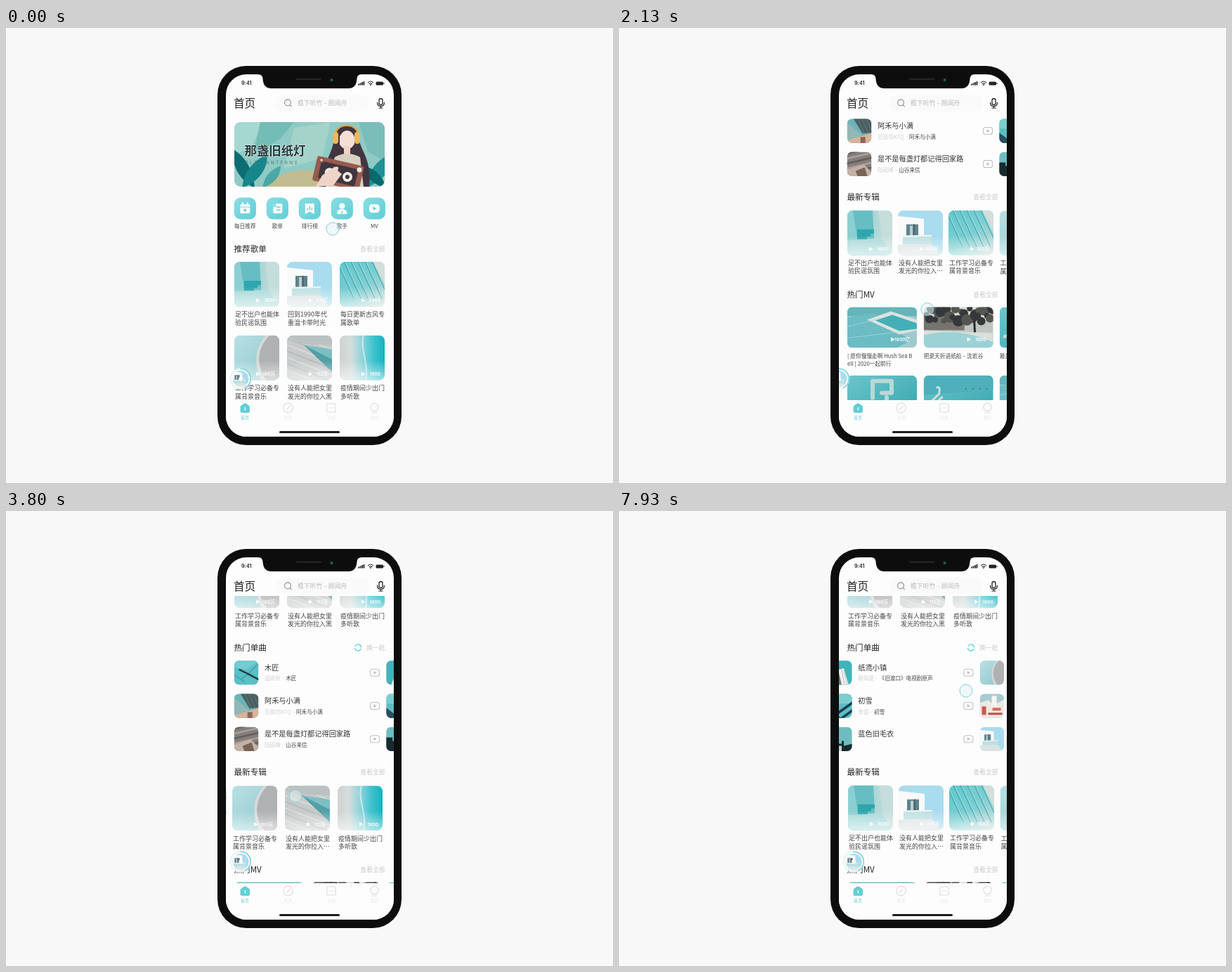
Animation of 864 by 648 pixels, one loop 8 s. Source, as an HTML page:

```html
<!DOCTYPE html>
<html lang="zh-CN">
<meta charset="utf-8">
<title>音乐首页</title>
<style>
  html, body { margin: 0; width: 100%; height: 100%; overflow: hidden; background: #f8f8f8; }
  svg { display: block; width: 100%; height: 100%; }
  text { font-family: "Noto Sans CJK SC", "Noto Sans CJK", "Noto Sans", sans-serif; white-space: pre; }
  .latin { font-family: Inter, Roboto, "Noto Sans CJK SC", "Noto Sans CJK", sans-serif; }
</style>
<svg id="stage" viewBox="0 0 864 648"></svg>
<script>
const TEAL = '#62ced5', DARK = '#333', GREY = '#c9c9c9', PAGE = 216.5, LOOP = 8000;

// Drawing helpers
const rect = (x, y, w, h, fill, r = 0, more = '') =>
  `<rect x="${x}" y="${y}" width="${w}" height="${h}" rx="${r}" fill="${fill}" ${more}/>`;
const circle = (x, y, r, fill, more = '') => `<circle cx="${x}" cy="${y}" r="${r}" fill="${fill}" ${more}/>`;
const poly = (points, fill) => `<polygon points="${points}" fill="${fill}"/>`;
const path = (d, fill) => `<path d="${d}" fill="${fill}"/>`;
const line = (d, color, width = 1) =>
  `<path d="${d}" fill="none" stroke="${color}" stroke-width="${width}" stroke-linecap="round" stroke-linejoin="round"/>`;
const group = (x, y, body, more = '') => `<g transform="translate(${x} ${y})" ${more}>${body}</g>`;
const text = (x, middle, size, str, fill = DARK, more = '') =>
  `<text x="${x}" y="${middle + size * .37}" font-size="${size}" fill="${fill}" ${more}>${str}</text>`;
const END = 'text-anchor="end"', MID = 'text-anchor="middle"';
const clip = (id, shape) => `<clipPath id="${id}">${shape}</clipPath>`;
const gradient = (id, x2, y2, ...colors) => `<linearGradient id="${id}" x2="${x2}" y2="${y2}">${
  colors.map((c, i) => `<stop offset="${i / (colors.length - 1)}" stop-color="${c}"/>`).join('')}</linearGradient>`;
const repeat = (n, fn) => Array.from({ length: n }, (_, i) => fn(i)).join('');

const defs = `<defs>
  ${gradient('mint', 1, 1, '#86dfe3', '#62cdd6')}
  ${gradient('wall', 1, 0, '#74c6c9', '#a3d5d5', '#c9dedb')}
  ${gradient('slats', 1, 1, '#60c6cc', '#7bced1', '#cfdcda')}
  ${gradient('mist', 1, 1, '#b9e0e4', '#8cc6cb')}
  ${gradient('sea', 1, 0, '#cfd2d1', '#d5dddb', '#8fd3da', '#3fc3cf', '#14b2bf')}
  ${gradient('water', 1, 1, '#6cc5cb', '#37a6af')}
  ${gradient('fade', 0, 1, '#ffffff00', '#ffffff99')}
  ${clip('card', rect(0, 0, 64, 64, '#000', 8))}
  ${clip('thumb', rect(0, 0, 34.5, 34.5, '#000', 7))}
  ${clip('video', rect(0, 0, 99, 58, '#000', 7))}
  ${clip('banner', rect(325, 134, 214, 92, '#000', 9))}
  ${clip('screen', rect(313, 66, 239, 516, '#000', 29))}
  ${clip('feedArea', rect(313, 121, 239, 409, '#000'))}
  ${clip('label', circle(0, 0, 11.5, '#000'))}
</defs>`;

// Cover art, drawn on a 64 px square
const covers = {
  stairs: rect(0, 0, 64, 64, 'url(#wall)') + poly('0,0 8,0 18,30 14,64 0,64', '#8bcfd1') +
    poly('8,0 36,0 38,40 14,40', '#66bec2') +
    poly('14,27 38,27 38,33 33,33 33,37 28,37 28,41 14,41', '#2fa5ae') +
    poly('44,0 64,0 64,64 50,46', '#c5dedb') + poly('0,42 50,42 64,64 0,64', '#a9d9da'),
  house: rect(0, 0, 64, 64, '#a9dcee') + poly('0,8 37,12 37,64 0,64', '#fafafa') +
    rect(12, 20, 17, 16, '#61828a') + rect(17, 22, 4, 14, '#b8cfd2') + line('M23 20V36', '#3d555c', 1.2) +
    poly('7,36 48,35 48,48 7,49', '#bfdfe2') + poly('7,36 48,35 48,37 7,38', '#edf7f7') +
    poly('0,49 48,48 60,64 0,64', '#dce3e3'),
  slats: rect(0, 0, 64, 64, 'url(#slats)') +
    repeat(7, i => line(`M${i * 10 - 4} 0l24 52`, '#46a5ab', 1.1) + line(`M${i * 10 - 2} 0l24 52`, '#a6e0e2', .8)) +
    poly('48,0 64,0 64,32', '#d3dedb'),
  curve: rect(0, 0, 64, 64, 'url(#mist)') + path('M50 0C32 18 30 44 46 64H64V0Z', '#b0b1b3') +
    path('M50 0C32 18 30 44 46 64H39C27 42 29 18 45 0Z', '#d9d9d8'),
  planks: rect(0, 0, 64, 64, '#c7caca') +
    repeat(8, i => line(`M-4 ${i * 9 - 6}l72 28`, i % 2 ? '#b2b7b7' : '#dcdedd', 1.5)) +
    poly('24,14 64,20 64,52', '#529fa5') + poly('24,14 64,20 64,34', '#7cbfc3') + poly('0,0 64,0 64,14 20,12', '#bac1c1'),
  shore: rect(0, 0, 64, 64, 'url(#sea)') + line('M34 0C28 18 42 40 37 64', '#ffffff88', 2),
};

// Song art, drawn on a 34.5 px square
const thumbs = {
  pole: rect(0, 0, 35, 35, '#5abfc7') + poly('0,0 35,0 18,13 0,10', '#74cbd1') +
    line('M9 27L20 19 35 4', '#2f7f89', 1) + line('M8 13L22 20 35 27', '#263f47', 2.6) + line('M0 20l15 10', '#45a4ad', 1.5),
  roof: rect(0, 0, 35, 35, '#6bb4b8') + poly('9,0 35,0 35,20 22,21', '#4a5f62') +
    repeat(4, i => line(`M${15 + i * 6} 0l9 20`, '#657a7b')) + poly('0,5 26,28 0,30', '#93b7b6') +
    poly('0,31 35,20 35,35 0,35', '#d7b49a') + rect(19, 26, 7, 9, '#8c6658'),
  tiles: rect(0, 0, 35, 35, '#847d7b') + repeat(5, i => line(`M-2 ${i * 7 + 3}l38 -9`, i % 2 ? '#aaa09a' : '#625e5d', 2.5)) +
    poly('0,25 24,18 35,29 35,35 0,35', '#c5b2a5') + poly('12,27 25,22 29,35 15,35', '#786459'),
  tower: rect(0, 0, 35, 35, '#42b3ba') + poly('7,35 15,13 23,11 30,35', '#eef0ed') +
    poly('15,13 20,35 12,35', '#6d7c7e') + line('M20 13l4 22M23 13l5 22', '#b0bcbd', .8),
  beams: rect(0, 0, 35, 35, '#5dbcc2') + rect(0, 0, 35, 14, '#7dced0') +
    line('M4 35L35 13M17 37L36 23', '#163f4b', 3.5) + poly('0,20 20,35 0,35', '#2b4d59'),
  skyline: rect(0, 0, 35, 35, '#6dbdc0') + poly('0,15 9,15 9,20 14,20 14,24 20,24 20,20 23,20 23,27 35,24 35,35 0,35', '#182a2f') +
    rect(11, 12, 3, 23, '#25383c') + rect(15, 27, 5, 8, '#c3d4d3'),
  bay: `<g transform="scale(.54)">${covers.curve}</g>`,
  red: rect(0, 0, 35, 35, '#a8cbd2') + poly('0,13 12,9 20,16 35,8 35,35 0,35', '#eee8e2') +
    rect(3, 18, 6, 12, '#c95a50') + rect(17, 3, 7, 15, '#f6f4f1') + rect(18, 20, 12, 4, '#d96a5c') + rect(12, 27, 20, 3, '#bb5149'),
  balcony: `<g transform="scale(.54)">${covers.house}</g>`,
};

// Video art, drawn on 99 x 58 px
const clips = {
  pool: rect(0, 0, 99, 58, '#9fcbce') + rect(0, 0, 99, 13, '#64b4ba') + poly('0,15 38,8 90,48 70,58 0,58', '#6cbcc4') +
    poly('28,18 62,6 99,18 99,33 74,39', '#dce2df') + poly('40,19 64,11 99,23 99,31 74,34', '#45afb8') + line('M0 28L48 16M0 44L70 36', '#a8dade', .7),
  tree: rect(0, 0, 99, 58, '#bfc6c2') + rect(0, 0, 99, 18, '#d9d9d4') + rect(0, 13, 58, 20, '#77736e') +
    repeat(24, i => circle(4 + i * 4.1, 11 + 9 * Math.sin(i * 2.4), 4 + i % 3 * 2, i % 2 ? '#35383a' : '#555552')) +
    line('M73 40L72 20', '#262a2c', 3) + poly('0,33 99,37 99,58 0,58', '#d9dfdb') + path('M0 40Q50 28 99 50V58H0Z', '#9bd2d5'),
  ruins: rect(0, 0, 99, 58, 'url(#water)') + line('M8 42H56V31M36 32V8H63V25H49', '#b9d8d6', 6) + line('M8 45H58', '#5d9da3', 2),
  ladder: rect(0, 0, 99, 58, 'url(#water)') + poly('0,0 99,0 99,20 0,28', '#4fafba') +
    line('M2 46L22 26Q24 15 19 17M9 47L26 31', '#cadfdc', 3) + repeat(4, i => circle(60 + i * 10, 19, 1, '#287780')),
};

const play = (x, y) => poly(`${x},${y - 3} ${x + 5.5},${y} ${x},${y + 3}`, '#fff');
const tile = (shape, x, y, art) => group(x, y, art, `clip-path="url(#${shape})"`);
const lines = (x, y, size, rows, gap = 11.5) => rows.split('|').map((s, i) => text(x, y + i * gap, size, s, '#444')).join('');

const card = (x, y, [art, count, caption]) =>
  tile('card', x, y, covers[art] + rect(0, 36, 64, 28, 'url(#fade)') + play(31, 55) +
    text(58, 55, 6.5, count, '#fff', END + ' class="latin" font-weight="600"')) + lines(x + 1, y + 75, 9, caption);
const cards = (y, gap, list) => list.map((item, i) => card(325 + i * gap, y, item)).join('');

const song = (y, [art, title, artist, album]) =>
  tile('thumb', 324.7, y - 17.2, thumbs[art]) + text(368, y - 7.5, 10.2, title) +
  (artist ? text(368, y + 8.3, 7.6, `${artist} – <tspan fill="#444">${album}</tspan>`, '#d2d2d2') : '') +
  rect(518.5, y - 5, 13, 10, 'none', 3, 'stroke="#c2c2c2" stroke-width="1.1"') +
  poly(`523.5,${y - 2.3} 527.5,${y} 523.5,${y + 2.3}`, '#bbb');
const songs = (y, list) => list.map((item, i) => song(y + i * 47.2, item)).join('');

const video = (x, y, art, count, caption) =>
  tile('video', x, y, clips[art] + play(62, 46) +
    text(89, 46, 6.5, count, '#fff', END + ' class="latin" font-weight="600"')) + lines(x, y + 69.3, 7.7, caption);

const heading = (y, title, link = '查看全部') =>
  text(324.5, y, 11.6, title, '#222', 'font-weight="500"') + text(539.5, y, 8.8, link, GREY, END);

const study = '工作学习必备专|属背景音乐', home = '足不出户也能体|验民谣氛围';
const picksTop = [['stairs', '1800', home], ['house', '2.5亿', '回到1990年代|重温卡带时光'], ['slats', '2456', '每日更新古风专|属歌单']];
const picksLow = [['curve', '180万', study], ['planks', '112万', '没有人能把女里|发光的你拉入黑'], ['shore', '1800', '疫情期间少出门|多听歌']];
const albumsA = [['stairs', '1800', home], ['house', '240万', '没有人能把女里|发光的你拉入…'], ['slats', '180万', study]];
const albumsB = [picksLow[0], ['planks', '112万', '没有人能把女里|发光的你拉入…'], picksLow[2]];
const songsA = [['pole', '木匠', '温砚秋', '木匠'], ['roof', '阿禾与小满', '豆腐坊KTQ', '阿禾与小满'],
  ['tiles', '是不是每盏灯都记得回家路', '陆砚峰', '山谷来信']];
const songsB = [['tower', '纸鸢小镇', '穆知夏', '《旧渡口》电视剧原声'], ['beams', '初雪', '季遥', '初雪'], ['skyline', '蓝色旧毛衣']];
const songsC = [['bay', '浅滩拾贝', '程鹿溪', '浅滩拾贝'], ['red', '屋檐下的猫', '秦晚舟', '屋檐下的猫'], ['balcony', '阳台']];

const leaf = (x, y, w, h, fill) => path(`M${x} ${y}Q${x + w * .1} ${y - h * .7} ${x + w} ${y - h}Q${x + w} ${y - h * .3} ${x} ${y}Z`, fill);
const banner = `<g clip-path="url(#banner)">
  ${rect(325, 134, 214, 92, '#8fcac4')}
  ${poly('325,134 365,134 350,170 325,180', '#a5d8d0')}${poly('362,134 410,134 390,158 352,181', '#74bcb6')}
  ${poly('410,142 462,134 450,186 395,200', '#a3d3c9')}${poly('502,134 539,134 539,190 515,176', '#7bbeb9')}
  ${path('M360 226Q410 190 462 208V226Z', '#c2bd90')}
  ${leaf(354, 228, -32, 56, '#0c6d73')}${leaf(336, 228, 36, 48, '#16868a')}${leaf(365, 228, 26, 32, '#4aa8a7')}
  ${leaf(512, 228, 38, 50, '#228f94')}${leaf(540, 228, -30, 32, '#08696f')}
  ${path('M467 157C466 132 501 132 502 157C506 178 520 185 517 226H446C448 195 464 184 467 157Z', '#43353f')}
  ${path('M475 150Q486 142 496 150V165Q486 181 475 166Z', '#f5dfd4')}${rect(481, 168, 9, 15, '#efd3c6')}
  ${path('M473 149Q480 137 497 149V157Q492 145 485 146Q478 146 473 159Z', '#43353f')}
  ${path('M468 184Q485 174 504 184L509 226H455Z', '#d9d0c4')}
  ${line('M469 153C468 134 502 134 501 153', '#dba952', 2.5)}
  ${rect(465, 148, 8, 17, '#e9b85f', 4)}${rect(496, 148, 8, 17, '#e9b85f', 4)}
  <g transform="translate(473 206) rotate(13)">${rect(-34, -17, 68, 36, '#965b4e', 3)}
    ${rect(-27, -11, 54, 25, '#40363f', 3)}${circle(-12, 3, 7, '#f2ece5')}${circle(14, 3, 7, '#f2ece5')}
    ${circle(-12, 3, 3, '#40363f')}${circle(14, 3, 3, '#40363f')}</g>
  ${circle(449, 188, 4, '#965b4e')}${circle(503, 202, 3.5, '#f2ece5')}${circle(449, 188, 1.6, '#eee')}
  ${path('M441 226L450 210 467 198Q476 196 472 203L478 208 466 224Z', '#efd5c8')}
  ${text(339.5, 175, 17.4, '那盏旧纸灯', '#27383d', 'font-weight="700" stroke="#e4f1ed" stroke-width="1.2" paint-order="stroke"')}
  ${text(340, 192, 6.3, 'OLD LANTERNS', '#56797b', 'class="latin" letter-spacing="2.4"')}
</g>`;

const glyphs = [
  rect(-7, -6, 14, 13, '#fff', 2.5) + line('M-7 -2H7', '#70d3d9') + line('M-3.5 -8V-5M3.5 -8V-5', '#fff', 2) + circle(0, 2.4, 2, TEAL),
  rect(-6, -7, 13, 14, '#fff', 2.5) + line('M-1 -2H4M-1 2H4', TEAL, 1.3) + rect(-7, -7, 5, 5, '#8be0e4', 1),
  path('M-6.5 -7H6.5V8L0 4.5 -6.5 8Z', '#fff') + line('M-3 2V0M0 2V-3M3 2V-1', TEAL, 1.3),
  circle(0, -3.5, 4, '#fff') + path('M-7 8V6Q-6 1 0 1T7 6V8Z', '#fff') + line('M0 4V7', TEAL, 1.5),
  rect(-7.5, -6, 15, 12, '#fff', 4.5) + poly('-1.8,-3 3,0 -1.8,3', TEAL),
];
const shortcuts = ['每日推荐', '歌单', '排行榜', '歌手', 'MV'].map((name, i) => {
  const x = 340.3 + i * 46;
  return rect(x - 15.6, 241.5, 31.2, 31, 'url(#mint)', 9) + group(x, 257, glyphs[i]) + text(x, 282, 7.7, name, '#444', MID);
}).join('');

const feed = `<g clip-path="url(#feedArea)"><g id="feed">
  ${banner}${shortcuts}
  ${heading(315, '推荐歌单')}${cards(333, 75, picksTop)}${cards(437.7, 75, picksLow)}
  ${heading(558, '热门单曲', '换一批')}
  <g id="refresh">${circle(0, 0, 4.6, 'none', `stroke="${TEAL}" stroke-width="1.3" stroke-dasharray="12 2.45"`)}</g>
  <g id="oldSongs">${songs(593.8, songsA)}${group(PAGE, 0, songs(593.8, songsB))}</g>
  <g id="newSongs">${songs(593.8, songsB)}${group(PAGE, 0, songs(593.8, songsC))}</g>
  ${heading(735.3, '最新专辑')}
  <g id="albums">${cards(754.2, 72, albumsA)}${group(PAGE, 0, cards(754.7, 75, albumsB))}</g>
  ${heading(874, '热门MV')}
  ${video(325, 892, 'pool', '1800亿', '[ 愿你慢慢走啊 Hush Sea B|ell ] 2020一起前行')}
  ${video(433.7, 892, 'tree', '1800', '把夏天折进纸船 – 沈若谷')}
  ${video(541.7, 892, 'ruins', '', '最美的夏日海岸')}
  ${video(325, 989.4, 'ruins', '1800万', '青苔三寸月初升 《九重雁归》|（电视剧主题曲）')}
  ${video(433.7, 989.4, 'ladder', '1800', '《竹影书生》唐砚白动漫主题|曲 – 乔木川')}
  ${video(541.7, 989.4, 'pool', '', '最美的夏日海岸')}
  ${heading(1103.5, '新歌')}${songs(1139, songsB)}${group(PAGE, 0, songs(1139, songsA))}
</g></g>`;

const header = text(335, 78.5, 7.2, '9:41', '#222', 'class="latin" font-weight="600"') +
  repeat(4, i => rect(501 + i * 2.5, 79.5 - i * 1.2, 1.8, 2 + i * 1.2, '#222', .5)) +
  line('M515.5 77.5Q519 74.5 522.5 77.5M517 79.5Q519 78 521 79.5', '#222', 1.1) + circle(519, 81, .9, '#222') +
  rect(526.5, 76.5, 10.5, 5, '#222', 1.5) + rect(537.5, 78, 1, 2, '#222') +
  text(324, 107, 15.6, '首页', '#222', 'font-weight="500"') + rect(385, 95.5, 132, 23, '#fafafa', 8) +
  circle(401, 106.3, 4.4, 'none', 'stroke="#888" stroke-width="1.1"') + line('M404.3 109.6l2 2', '#888', 1.1) +
  text(415, 107, 8.8, '檐下听竹 – 顾闻舟', '#b9b9b9') +
  rect(531, 100.5, 5, 9, 'none', 2.5, 'stroke="#222" stroke-width="1.3"') +
  line('M528.5 106Q528.5 111.5 533.5 111.5T538.5 106M533.5 111.5V114M531 114H536', '#222', 1.2);

const PALE = '#dedede';
const tabs = rect(313, 530, 239, 52, '#fdfdfd') +
  path('M333.5 540Q333.5 538.5 335 537.5L339 534.8Q340.3 534 341.6 534.8L345.6 537.5Q347 538.5 347 540V545.5Q347 548 344.5 548H336Q333.5 548 333.5 545.5Z', TEAL) +
  line('M340.3 540.5V544', '#fff', 1.3) + circle(401.5, 541, 6.8, 'none', `stroke="${PALE}" stroke-width="1.2"`) +
  line('M400 543L404 538.5', PALE, 1.3) + rect(456.7, 535, 12.5, 12, 'none', 2.5, `stroke="${PALE}" stroke-width="1.2"`) +
  line('M460 541H462M464 541H466', PALE, 1.2) + circle(524.5, 540, 5.7, 'none', `stroke="${PALE}" stroke-width="1.2"`) + line('M521 548H528', PALE, 1.2) +
  ['首页', '发现', '动态', '我的'].map((s, i) => text(340 + i * 61.5, 554.5, 6, s, i ? '#e9e9e9' : TEAL, MID)).join('') +
  rect(389, 574, 86, 3, '#1c1c1c', 1.5);

const disc = `<g id="disc">${circle(0, 0, 15.3, '#fff', 'opacity=".85"')}
  <g id="label"><g clip-path="url(#label)">${group(-14, -14, `<g transform="scale(.44)">${covers.house}</g>`)}</g>
  ${circle(0, 0, 3, '#ffffffcc')}</g>
  ${circle(0, 0, 14.3, 'none', 'stroke="#d5eef2" stroke-width="1.2"')}
  ${line('M0 -14.3A14.3 14.3 0 0 1 6 13', '#79d0dc', 1.5)}</g>`;

const stage = document.getElementById('stage');
stage.innerHTML = defs + rect(301, 54, 262, 540, '#0d0d0d', 41) + rect(313, 66, 239, 516, '#fdfdfd', 29) +
  `<g clip-path="url(#screen)">${feed}${header}${tabs}${disc}</g>` +
  path('M359 66Q365 66 365.5 72Q366 86 378 86H487Q499 86 499.5 72Q500 66 506 66V64H359Z', '#0d0d0d') +
  rect(413, 71.5, 36, 2.5, '#242424', 1.2) + circle(463.5, 74, 3, '#152527') + circle(463.5, 74, 1.2, '#307f80') +
  `<g id="pointer">${circle(0, 0, 9, '#e2f2f480', 'stroke="#86cfd6" stroke-width="1"')}</g>`;

// Timeline: keys are [time, ...values]
const easeOut = p => 1 - (1 - p) ** 2;
const easeBoth = p => p * p * (3 - 2 * p);
const at = (t, keys, ease = easeOut) => {
  const next = keys.findIndex(k => k[0] > t);
  if (next < 1) return (next ? keys[keys.length - 1] : keys[0]).slice(1);
  const [t0, ...from] = keys[next - 1], [t1, ...to] = keys[next];
  const p = ease((t - t0) / (t1 - t0));
  return from.map((v, i) => v + (to[i] - v) * p);
};

const scrollKeys = [[0, 0], [200, 0], [1000, 365], [1130, 365], [1670, 700], [1800, 700], [2600, 387], [2950, 363.5]];
const albumKeys = [[2980, 0], [3480, -222], [3800, -219.5], [4050, -PAGE], [4420, -PAGE], [5050, 0], [5200, 1]];
const songKeys = [[7000, -.5], [7380, -PAGE], [7560, -PAGE], [7930, -28], [8000, -16]];
const discKeys = [[150, 334], [400, 313], [3480, 313], [3760, 334]];
const pointerKeys = [[0, 465, 286], [200, 430, 420], [600, 420, 285], [1000, 420, 300], [1130, 424, 430], [1430, 420, 335],
  [1670, 421, 370], [1800, 425, 290], [2200, 440, 410], [2600, 440, 357], [2980, 495, 420], [3350, 402, 418], [3800, 412, 406],
  [4400, 398, 425], [4750, 490, 425], [5200, 505, 243], [5500, 506, 193], [5800, 506, 193], [6130, 485, 223],
  [6400, 468, 258], [7000, 485, 258], [7300, 400, 257], [7520, 408, 257], [7930, 494, 256], [8000, 497, 256]];

const part = id => document.getElementById(id);
const move = (id, x, y, turn = 0) => part(id).setAttribute('transform', `translate(${x} ${y}) rotate(${turn})`);

function draw(now) {
  const t = now % LOOP;
  const [swap] = at(t, [[5650, 0], [5950, 1]], easeBoth);
  move('feed', 0, -at(t, scrollKeys)[0]);
  move('albums', at(t, albumKeys)[0], 0);
  move('newSongs', at(t, songKeys)[0], 0);
  part('oldSongs').setAttribute('opacity', 1 - swap);
  part('newSongs').setAttribute('opacity', swap);
  move('refresh', 501, 558, at(t, [[5600, 20], [6050, 380]], easeBoth)[0]);
  move('disc', at(t, discKeys, easeBoth)[0], 499.5);
  move('label', 0, 0, t * .09);
  move('pointer', ...at(t, pointerKeys, easeBoth));
  requestAnimationFrame(draw);
}
requestAnimationFrame(draw);
</script>
</html>
```
